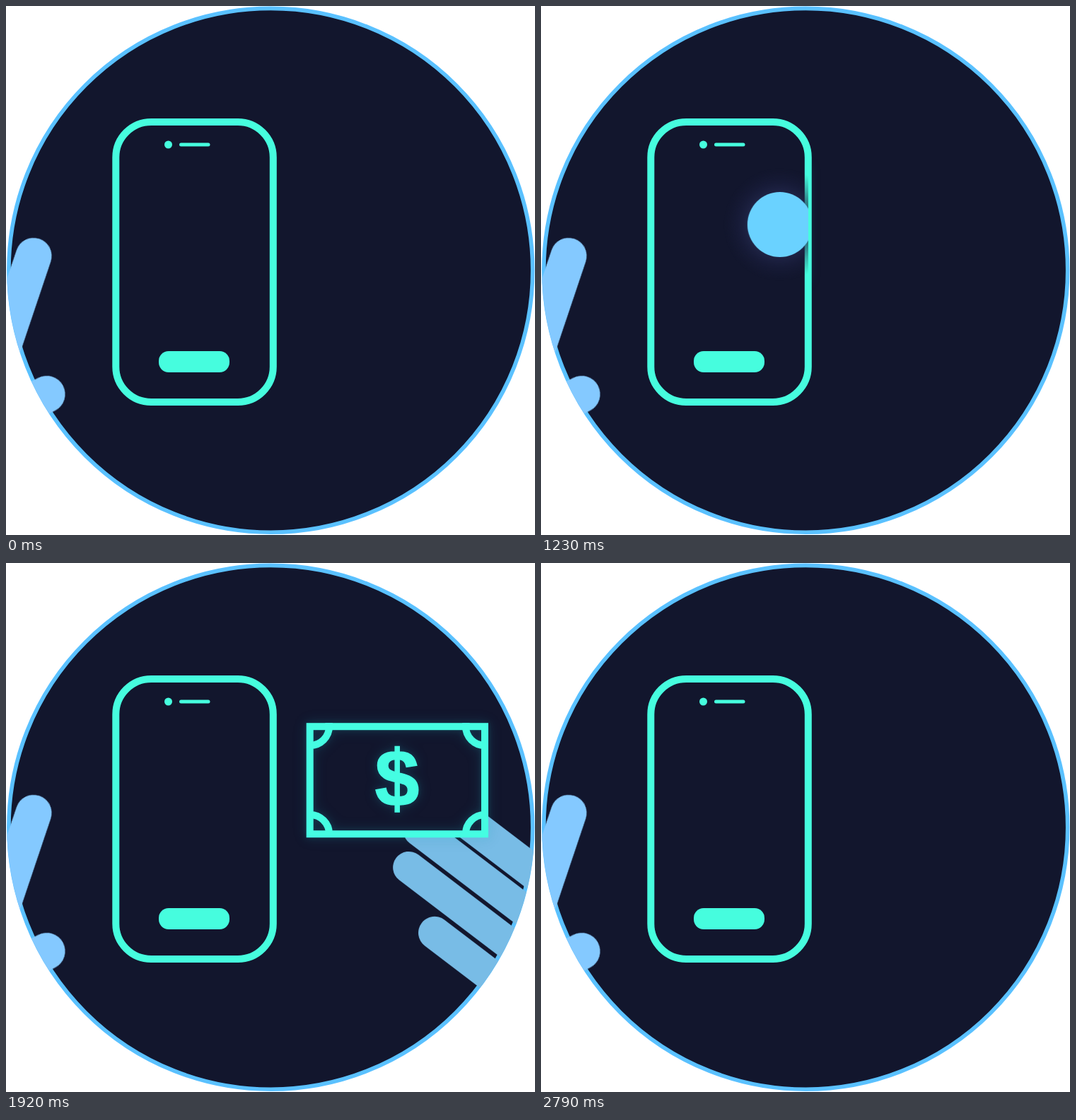
An HTML page that plays this animation: 748x748 px, repeating every 3000 ms.

```html
<!DOCTYPE html>
<html lang="en">
<head>
<meta charset="utf-8">
<title>Phone payment to cash</title>
<style>
  html, body { margin: 0; width: 100%; height: 100%; overflow: hidden; background: #fff; }
  svg { display: block; width: 100%; height: 100%; }

  .hand, .press, .coin, .bill, .shine, .grab { animation: 3s linear infinite; }

  .hand { animation-name: tap; transform-origin: -66px 775px; }
  .press { animation-name: press; }
  .coin { animation-name: coin; }
  .bill { animation-name: bill; }
  .shine { animation-name: shine; }
  .grab { animation-name: grab; }

  .press, .shine {
    color: #48fff6;
    filter: drop-shadow(0 0 4px #22d9e0) drop-shadow(0 0 9px #1a7f9a);
  }

  @keyframes tap {
    0% { transform: rotate(-30.4deg); animation-timing-function: cubic-bezier(.33, 0, .67, 1); }
    9.4% { transform: rotate(4.9deg); animation-timing-function: cubic-bezier(.33, 0, .67, 1); }
    20.6%, 100% { transform: rotate(-30.4deg); }
  }
  @keyframes press {
    0%, 7% { opacity: 0; }
    9.5%, 13% { opacity: 1; }
    18.5%, 100% { opacity: 0; }
  }
  @keyframes coin {
    0%, 15.5% { transform: translate(269px, 286px) scale(0); animation-timing-function: ease-out; }
    21% { transform: translate(269px, 286px) scale(1); }
    36.5% { transform: translate(269px, 286px) scale(1); animation-timing-function: cubic-bezier(.4, 0, .75, .6); }
    41% { transform: translate(337px, 309px) scale(1); }
    47.5% { transform: translate(488px, 309px) scale(1); }
    47.6%, 100% { transform: translate(488px, 309px) scale(0); }
  }
  @keyframes bill {
    0%, 39.7% { transform: translate(-318px, 0); animation-timing-function: cubic-bezier(.35, 0, .35, 1); }
    52.7%, 54% { transform: translate(43px, 0); animation-timing-function: cubic-bezier(.33, 0, .67, 1); }
    62% { transform: none; }
    74.5% { transform: none; animation-timing-function: cubic-bezier(.333, 0, .667, .333); }
    93.5%, 100% { transform: translate(341px, 341px); }
  }
  @keyframes shine {
    0%, 39.7% { opacity: 0; }
    45%, 55% { opacity: 1; }
    66%, 100% { opacity: 0; }
  }
  @keyframes grab {
    0%, 55% { transform: translate(300px, 300px); animation-timing-function: cubic-bezier(.33, 0, .3, 1); }
    72% { transform: none; }
    74.5% { transform: none; animation-timing-function: cubic-bezier(.333, 0, .667, .333); }
    93.5%, 100% { transform: translate(341px, 341px); }
  }
</style>
</head>
<body>
<svg viewBox="0 0 748 748">
  <defs>
    <clipPath id="disc"><circle cx="374.3" cy="373.8" r="373"/></clipPath>
    <clipPath id="screen"><rect x="155" y="164" width="223" height="396"/></clipPath>
    <clipPath id="outside"><rect x="382" y="0" width="366" height="748"/></clipPath>
    <radialGradient id="halo">
      <stop offset=".55" stop-color="#262c52" stop-opacity=".7"/>
      <stop offset=".75" stop-color="#20244a" stop-opacity=".35"/>
      <stop offset="1" stop-color="#1b1f3e" stop-opacity="0"/>
    </radialGradient>
    <rect id="button" x="216" y="488" width="100" height="30" rx="14" fill="currentColor"/>
    <clipPath id="note"><rect x="425" y="226" width="257" height="162"/></clipPath>
    <g id="cash" fill="none" stroke="currentColor" stroke-width="10">
      <g clip-path="url(#note)">
        <circle cx="430" cy="231" r="27"/>
        <circle cx="677" cy="231" r="27"/>
        <circle cx="430" cy="383" r="27"/>
        <circle cx="677" cy="383" r="27"/>
      </g>
      <rect x="429.7" y="231.2" width="247.300" height="152"/>
      <text x="553" y="343.5" text-anchor="middle" font-family="'Liberation Sans', Arial, sans-serif"
        font-weight="700" font-size="113" fill="currentColor" stroke-width="1.5">$</text>
    </g>
  </defs>

  <circle cx="374.3" cy="373.8" r="370.4" fill="#12162d" stroke="#5ac1ff" stroke-width="5.600"/>

  <g clip-path="url(#disc)" color="#46fdde">
    <!-- phone -->
    <rect x="155.3" y="164" width="222.5" height="396" rx="50" fill="none" stroke="currentColor" stroke-width="10"/>
    <circle cx="229.5" cy="196" r="5.5" fill="currentColor"/>
    <path d="M247.500 196H286" stroke="currentColor" stroke-width="5" stroke-linecap="round"/>
    <use href="#button"/>
    <use href="#button" class="press"/>

    <g clip-path="url(#screen)">
      <g class="coin">
        <circle r="80" fill="url(#halo)"/>
        <circle r="46" fill="#6ad2ff"/>
      </g>
    </g>

    <!-- hand taking the cash -->
    <g class="grab">
      <g transform="rotate(37.3)" fill="#78bce6" stroke="#78bce6" stroke-linecap="round">
        <path d="M705 36H830" stroke-width="46"/>
        <path d="M620 -15.500H830M600 -66H830" stroke-width="45"/>
        <path d="M625 -117H830" stroke-width="48"/>
        <path d="M805 -141H1150V59H805Z" stroke="none"/>
      </g>
      <path d="M760 416L726 414Q697 416 697 438Q699 463 736 475L760 482Z" fill="#63ccff"/>
    </g>

    <g clip-path="url(#outside)">
      <g class="bill">
        <rect x="428" y="229" width="251" height="156" fill="#12162d"/>
        <use href="#cash"/>
        <use href="#cash" class="shine"/>
      </g>
    </g>

    <!-- tapping hand -->
    <g class="hand" fill="#84c9ff" stroke="#84c9ff" stroke-linecap="round">
      <path d="M38 443L-262 704M91 461L-209 722M137 486L-163 747" stroke-width="53"/>
      <path d="M238 464.500L-62 725.500" stroke-width="51"/>
      <path d="M155 642.500L60 638.500" stroke-width="52"/>
      <path d="M107 614L80 662L-50 790L-250 640L20 480Z" stroke="none"/>
      <path d="M163 497L112 542M118 471L80 505M65 451L47 468" stroke="#6ba6d8" stroke-width="1" fill="none"/>
    </g>
  </g>
</svg>
</body>
</html>
```
